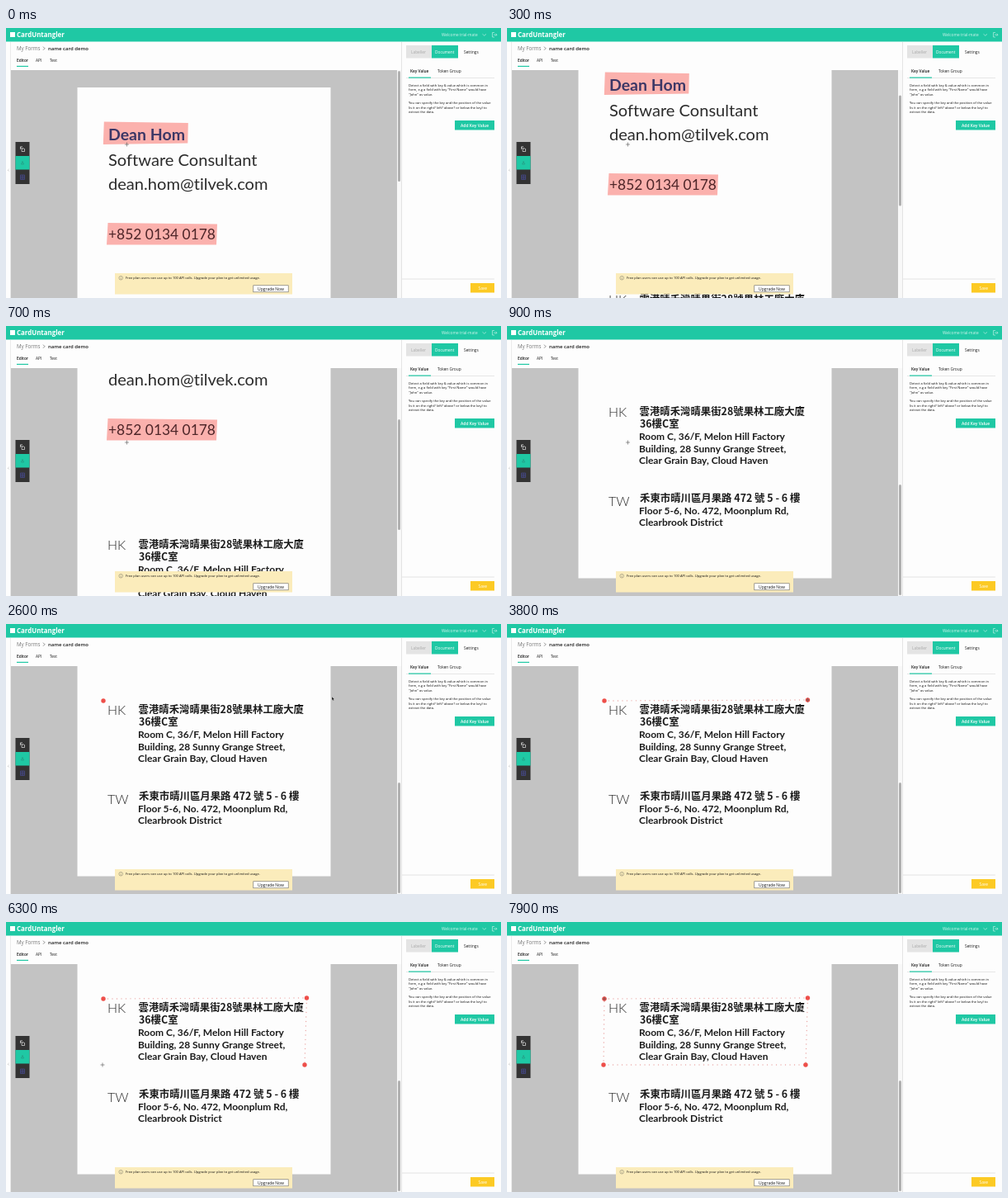
These frames come from a looping animation (600x327 px, 8 s). An HTML page:

```html
<!DOCTYPE html>
<html lang="en">
<head>
<meta charset="utf-8">
<title>Form editor</title>
<style>
  html, body { margin: 0; width: 100%; height: 100%; overflow: hidden; background: #fdfdfd; }
  svg { display: block; width: 100vw; height: 100vh; }
  text { font: 4.8px "Open Sans", "Noto Sans", sans-serif; fill: #1c1c1c; white-space: pre; font-variant-ligatures: none; }
  .semi { font-weight: 600; }
  .small text { font-size: 4.1px; fill: #111; }
  .white { fill: #fff; }
  .teal { fill: #1fc8a4; }
  .doc text { font: 20.1px Lato, "Open Sans", sans-serif; font-variant-ligatures: none; fill: #2c2c2c; }
  .doc .name { font-size: 19.5px; font-weight: 700; fill: #3c3766; }
  .doc .phone { font-size: 17.4px; fill: #4d2528; }
  .doc .code { font-size: 16px; font-weight: 300; }
  .doc .en text { font-size: 12px; font-weight: 700; fill: #1c1c1c; }
  .doc .zh text { font: 700 12.4px "Noto Sans CJK TC", "Noto Sans CJK HK", "Noto Sans CJK", "Noto Sans CJK JP", sans-serif; fill: #1c1c1c; }
  .icon { fill: none; stroke: #fff; stroke-width: .6; }
</style>
</head>
<body>
<svg viewBox="0 0 600 327" preserveAspectRatio="none">
  <clipPath id="view"><rect x="5.500" y="51" width="468.500" height="276"/></clipPath>
  <rect width="600" height="327" fill="#fdfdfd"/>

  <!-- scrolling document -->
  <g clip-path="url(#view)">
    <rect x="5.500" y="51" width="468.500" height="276" fill="#c3c3c3"/>
    <g id="doc" class="doc">
      <rect x="86.500" y="72" width="307" height="518.500" fill="#fdfdfd"/>
      <path d="M118.800 113.500L220.800 115 220.300 139.500 117.800 141ZM123.500 236L256 237.500 255 262.500 122 262.500Z" fill="#fbb1ad"/>
      <text class="name" x="124" y="136">Dean Hom</text>
      <text x="124" y="166.500">Software Consultant</text>
      <text x="124" y="195.500">dean.hom@tilvek.com</text>
      <text class="phone" x="124" y="256">+852 0134 0178</text>
      <g transform="translate(0 285)">
        <text class="code" x="123" y="110">HK</text>
        <text class="code" x="123" y="218">TW</text>
        <g class="zh">
          <text x="160.500" y="107.800">雲港晴禾灣晴果街28號果林工廠大廈</text>
          <text x="161" y="123">36樓C室</text>
          <text x="161" y="213.300">禾東市晴川區月果路 472 號 5 - 6 樓</text>
        </g>
        <g class="en">
          <text x="160" y="138">Room C, 36/F, Melon Hill Factory</text>
          <text x="160" y="152.500">Building, 28 Sunny Grange Street,</text>
          <text x="160" y="167">Clear Grain Bay, Cloud Haven</text>
          <text x="160" y="228">Floor 5-6, No. 472, Moonplum Rd,</text>
          <text x="160" y="242.300">Clearbrook District</text>
        </g>
      </g>
    </g>
  </g>
  <rect x="474" y="51" width="6" height="276" fill="#f8f8f8"/>
  <rect id="thumb" x="475" y="52" width="3" height="134" rx="1.5" fill="#b0b0b0"/>
  <path d="M5.500 17V327" stroke="#e6e6e6" stroke-width=".8"/>

  <!-- header -->
  <rect class="teal" width="600" height="16.500"/>
  <rect class="white" x="5" y="5" width="6" height="6"/>
  <text class="white" x="13" y="11.200" style="font-size:7.900px;font-weight:700">CardUntangler</text>
  <g opacity=".8">
    <text class="white" x="528" y="10">Welcome trial-mate</text>
    <path class="icon" d="M577.500 7.300L579.800 9.300 582 7.300M592 5.500H589.500V11H592M591 8.200H595M593.500 6.700L595 8.200 593.500 9.800"/>
  </g>

  <!-- breadcrumb and tabs -->
  <text x="13" y="26.800" style="font-size:6.200px;fill:#777">My Forms</text>
  <path class="icon" d="M45 22.700L47 24.700 45 26.700" style="stroke:#444"/>
  <text class="semi" x="51" y="26.800" style="font-size:6px">name card demo</text>
  <text class="semi" x="13" y="41.300">Editor</text>
  <text x="36" y="41.300">API</text>
  <text x="53" y="41.300">Test</text>
  <rect class="teal" x="13" y="45.800" width="14" height="1.200"/>

  <!-- tool buttons -->
  <rect x="11.500" y="138" width="17" height="51" fill="#333"/>
  <rect class="teal" x="11.500" y="155" width="17" height="16.500"/>
  <path class="icon" d="M17.500 144.500L20 147M17.500 147V143.800H20M19 147.500V149.500H22.500V146.500L20 145.500Z"/>
  <path class="icon" d="M18.500 165L20 161.500 21.500 165Z" style="stroke:#278f7b"/>
  <path class="icon" d="M17.500 178H22.500V183.500H17.500ZM17.500 180H22.500M17.500 181.800H22.500M20 178V183.500" style="stroke:#4a50a0"/>
  <path class="icon" d="M3.500 171L2.300 172.200 3.500 173.400" style="stroke:#aaa"/>

  <!-- side panel -->
  <path d="M479.500 17V327M480 304H592" stroke="#dedede" stroke-width=".8"/>
  <rect x="485" y="21" width="31" height="15.500" fill="#e4e4e4"/>
  <rect class="teal" x="516" y="21" width="32" height="15.500"/>
  <text x="491" y="30.800" style="fill:#aaa">Labeller</text>
  <text class="white" x="520" y="30.800">Document</text>
  <text x="555" y="30.800">Settings</text>
  <text class="semi" x="490" y="53.800">Key Value</text>
  <text x="523" y="53.800">Token Group</text>
  <path d="M485 60.500H592" stroke="#ddd" stroke-width=".7"/>
  <rect class="teal" x="488" y="59.500" width="27" height="1.200"/>
  <g class="small">
    <text x="488" y="70.800">Detect a field with key &amp; value which is common in</text>
    <text x="488" y="76.300">form, e.g a field with key "First Name" would have</text>
    <text x="488" y="81.800">"John" as value.</text>
    <text x="488" y="92.400">You can specify the key and the position of the value</text>
    <text x="488" y="97.900">(is it on the right? left? above? or below the key) to</text>
    <text x="488" y="103.400">extract the data.</text>
  </g>
  <rect class="teal" x="544" y="112" width="48" height="11.500"/>
  <text class="white semi" x="551" y="119.600" style="font-size:5px">Add Key Value</text>
  <rect x="563" y="309" width="29" height="11.500" fill="#fcca24"/>
  <text class="white" x="572.500" y="316.500">Save</text>

  <!-- upgrade banner -->
  <rect x="132" y="297" width="215" height="25.500" fill="#fbecbb"/>
  <circle class="icon" cx="139.200" cy="302.700" r="2.300" style="stroke:#776;stroke-width:.5"/>
  <path class="icon" d="M139.200 301.300V301.800M139.200 302.400V304.200" style="stroke:#776;stroke-width:.5"/>
  <g class="small"><text x="145" y="304.200">Free plan users can use up to 100 API calls. Upgrade your plan to get unlimited usage.</text></g>
  <rect x="299.800" y="311.800" width="42.400" height="8" fill="#fff" stroke="#666" stroke-width=".6"/>
  <text x="305" y="317.500" style="font-size:5px">Upgrade Now</text>

  <!-- selection and pointer -->
  <path id="edges" fill="none" stroke="#eba9a7" stroke-width="1.400" stroke-linecap="round" stroke-dasharray="0 5.500"/>
  <g id="dots" fill="#ee4f4a"></g>
  <path id="cross" d="M-2.500 0H2.500M0 -2.500V2.500" stroke="#555" stroke-width=".6"/>
  <path id="arrow" d="M0 0V4.500L1 3.600 1.700 5.200 2.500 4.800 1.800 3.300H3.200Z" fill="#111" stroke="#fff" stroke-width=".3"/>
</svg>
<script>
const LOOP = 8000, STEP = 100;
const $ = id => document.getElementById(id);

// each key: time, then values
const scroll = [[0, 0], [300, 60], [500, 108], [600, 108], [700, 124], [900, 285]];
const pointer = [
  [900, 146.5, 141], [1600, 118, 93], [2200, 118, 93], [2600, 395, 88], [2800, 395, 88],
  [3300, 364.5, 92], [3800, 364.5, 92], [4600, 362, 173], [5200, 362, 173],
  [6300, 117, 173], [6700, 117, 173], [6800, 118, 174], [7100, 118, 174], [7500, 118, 93]
];
const corners = [[118, 93], [364.5, 92], [362, 173], [117, 173]];
const clicks = [1900, 3500, 4800, 6500], closeAt = 7700;

function at(keys, t) {
  const i = keys.findIndex(k => k[0] > t);
  if (i === 0) return keys[0].slice(1);
  if (i < 0) return keys[keys.length - 1].slice(1);
  const a = keys[i - 1], b = keys[i], p = (t - a[0]) / (b[0] - a[0]);
  return a.slice(1).map((v, n) => v + (b[n + 1] - v) * p);
}

$('dots').innerHTML = corners.map(([x, y]) => `<circle cx="${x}" cy="${y}" r="2.7"/>`).join('');

function draw(t) {
  const [top] = at(scroll, t), [x, y] = at(pointer, t);
  $('doc').setAttribute('transform', `translate(0 ${-top})`);
  $('thumb').setAttribute('y', 52 + top * 140 / 285);

  const placed = clicks.filter(c => c <= t).length;
  [...$('dots').children].forEach((dot, i) => dot.style.display = i < placed ? '' : 'none');
  const line = placed > 1 ? 'M' + corners.slice(0, placed).join('L') : '';
  $('edges').setAttribute('d', line + (t >= closeAt ? 'Z' : ''));

  const onPage = x > 86 && x < 393;
  for (const [id, shown] of [['cross', onPage], ['arrow', !onPage]]) {
    $(id).setAttribute('transform', `translate(${x} ${y})`);
    $(id).style.display = shown ? '' : 'none';
  }
}

const start = performance.now();
function tick() {
  const t = (performance.now() - start) % LOOP;
  draw(Math.floor(t / STEP) * STEP);
  requestAnimationFrame(tick);
}
tick();
</script>
</body>
</html>
```
